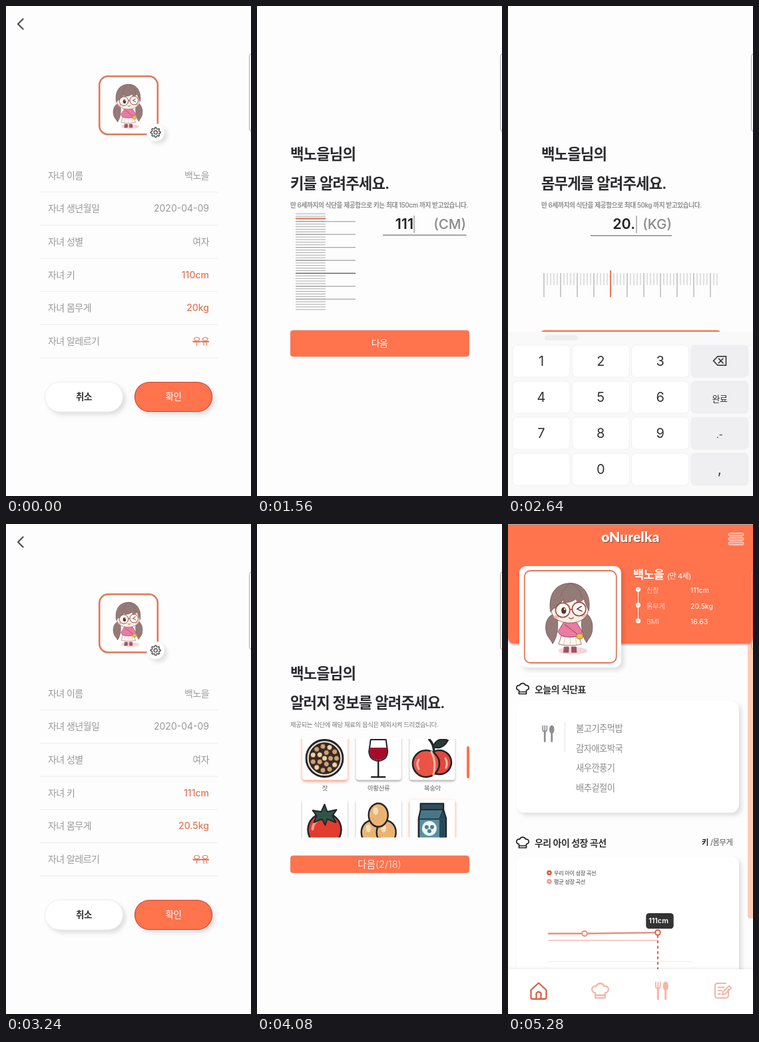
Write an HTML page that moves like this. It is 368 px wide and 734 px high and loops after 5400 ms.

```html
<!DOCTYPE html>
<html lang="ko">
<head>
<meta charset="utf-8">
<title>Child profile</title>
<style>
html, body { margin: 0; width: 100%; height: 100%; overflow: hidden; background: #fdfdfd; }
svg { display: block; width: 100vw; height: 100vh; }
text { font-family: Inter, 'Noto Sans CJK KR', 'Noto Sans CJK', sans-serif; white-space: pre; }
.logo { font-family: Lato, sans-serif; }
.soft { filter: drop-shadow(4px 4px 3px rgba(0,0,0,.12)); }
.low { filter: drop-shadow(0 2.5px 1.5px rgba(0,0,0,.32)); }
.pick { filter: drop-shadow(0 2.5px 2px rgba(255,90,50,.7)); }
</style>
</head>
<body>
<svg id="stage" viewBox="0 0 368 734" preserveAspectRatio="none"></svg>
<script>
const LOOP = 5400, STEP = 120;
const ORANGE = '#ff734d', RUST = '#e0785a', INK = '#2b2a2f', NAME = '백노을', BRAND = 'oNurelka';
const range = n => [...Array(n).keys()];
const clamp = v => Math.max(0, Math.min(1, v));

const text = (x, y, size, str, fill = INK, weight = 400, anchor = 'start', more = '') => {
  const gap = /[가-힣]/.test(str) ? -0.04 * size : 0;
  return `<text x="${x}" y="${y}" font-size="${size}" fill="${fill}" font-weight="${weight}"
    text-anchor="${anchor}" letter-spacing="${gap}" ${more}>${str}</text>`;
};
const rect = (x, y, w, h, r, fill, more = '') =>
  `<rect x="${x}" y="${y}" width="${w}" height="${h}" rx="${r}" fill="${fill}" ${more}/>`;
const line = (x1, y1, x2, y2, color, w = 1, more = '') =>
  `<line x1="${x1}" y1="${y1}" x2="${x2}" y2="${y2}" stroke="${color}" stroke-width="${w}" ${more}/>`;
const circle = (x, y, r, fill, more = '') => `<circle cx="${x}" cy="${y}" r="${r}" fill="${fill}" ${more}/>`;
const oval = (x, y, rx, ry, fill, more = '') =>
  `<ellipse cx="${x}" cy="${y}" rx="${rx}" ry="${ry}" fill="${fill}" ${more}/>`;
const path = (d, fill, stroke = 'none', w = 1, more = '') =>
  `<path d="${d}" fill="${fill}" stroke="${stroke}" stroke-width="${w}" stroke-linecap="round" stroke-linejoin="round" ${more}/>`;
const group = (id, body, more = '') => `<g id="${id}" ${more}>${body}</g>`;
const at = (x, y, body, s = 1) => `<g transform="translate(${x} ${y}) scale(${s})">${body}</g>`;

function gear(x, y) {
  const pts = range(32).map(i => {
    const a = (i - 0.5) * Math.PI / 16, r = i % 4 < 2 ? 7.4 : 5.6;
    return `${(x + r * Math.cos(a)).toFixed(1)} ${(y + r * Math.sin(a)).toFixed(1)}`;
  });
  return path(`M${pts.join('L')}Z`, 'none', '#555', 1.5) + circle(x, y, 2.6, 'none', 'stroke="#555" stroke-width="1.4"');
}

function girl() {
  const hair = '#957b78', edge = '#6d5052', skin = '#feeee4';
  return oval(186.5, 180.5, 13.5, 3.6, '#fad3d6') +
    path('M169 146C162 148 160 156 161.5 163C162.5 168 166 170 167.5 174C172 168 173 158 172 150Z', hair, edge, .5) +
    path('M198 145C204 148 206 156 204.5 163C203.5 168 201 169 199.5 173C195 167 194 157 195 150Z', hair, edge, .5) +
    path('M180.5 173V180M187.5 173V180', 'none', skin, 3.6) +
    path('M178.5 177h4v5h-4.5zM185.5 177h4l.5 5h-4.5z', '#a65264', edge, .5) +
    path('M176 166H192L194.5 174.5Q184 177 173.5 174.5Z', '#fff7f2', '#9b7274', .6) +
    path('M179 168L178 175M184 168V176M189 168L190 175', 'none', '#d7b9b6', .5) +
    path('M178 154Q184 152 190 154L195.5 163L192.5 166.5Q184 169 175.5 166.5L172.5 163Z', '#ea7ba3', '#8d4058', .6) +
    path('M179 156L192 166', 'none', '#a14b52', .7) + rect(190, 164.5, 6, 5, 2, '#efbd48', 'stroke="#98722a" stroke-width=".5"') +
    path('M166 141C166 127 173 118 184 117.5C195 117 202 127 201 141C201 150 193 154.5 183.5 154.5C174 154.5 166 150 166 141Z', skin, edge, .5) +
    path('M165.5 144C163 127 171 117.3 184 117.3C196 117.3 204 128 201.5 143C199.5 139 198 136 197 132C195 134 193 135 191 135.5L189.5 132Q185 135.5 178 135.5L177.5 132C175.5 137 171 140 168.5 141Z', hair, edge, .5) +
    path('M184 117.5Q177 122 175 130M186 118Q194 123 195 131', 'none', '#7d6260', .5) +
    oval(171, 148.8, 2.6, 1.5, '#f9b6b0') + oval(196.5, 147.5, 2.6, 1.5, '#f9b6b0') +
    circle(177, 142.5, 6.7, '#fff8', 'stroke="#96504a" stroke-width="1"') +
    circle(192.3, 141.5, 6.4, '#fff8', 'stroke="#96504a" stroke-width="1"') +
    path('M183.7 141.9L186 141.7', 'none', '#96504a', 1) +
    oval(178, 143, 2.3, 3.1, '#57302f') + circle(178.8, 141.6, .8, '#fff') +
    path('M194.5 139L190.5 141.5L195 143.5', 'none', '#57302f', .9) +
    path('M183 149.7Q185 151.6 187 149.4', 'none', '#a24a48', .8);
}

const hat = (x, y, color, s = 1) => at(x, y, path(
  'M-5.5 8V2.5C-11 1.5 -10 -6 -4.5 -4.8C-2.8 -9 2.8 -9 4.5 -4.8C10 -6 11 1.5 5.5 2.5V8ZM-5.5 5H5.5', 'none', color, 1.7), s);
const cutlery = (x, y, color, s = 1) => at(x, y,
  path('M-8 -11V-5.5Q-8 -3 -5 -3Q-2 -3 -2 -5.5V-11M-5 -11V-3', 'none', color, 1.6) +
  path('M-5 -3V11M5 0V11', 'none', color, 2.6) + oval(5, -6, 3.6, 6, color), s);

function profile() {
  const rows = [['이름', NAME], ['생년월일', '2020-04-09'], ['성별', '여자'], ['키', ''], ['몸무게', ''], ['알레르기', '우유']];
  const body = rows.map(([label, value], i) => {
    const y = 258.8 + i * 49.65, hot = i > 2;
    return text(63, y, 14, '자녀 ' + label, '#999') + line(51, y + 20, 318, y + 20, '#ececec') +
      text(305, y, 14, value, hot ? RUST : '#999', hot ? 500 : 400, 'end',
        (i == 3 ? 'id="cm" ' : i == 4 ? 'id="kg" ' : '') + (i == 5 ? 'text-decoration="line-through"' : ''));
  });
  return path('M25.5 19.5L18 27L25.5 34.5', 'none', '#555', 2.4) +
    rect(140.3, 105.3, 87.5, 87, 13, '#fff', `stroke="${RUST}" stroke-width="2.6"`) + '<use href="#girl"/>' +
    rect(211.5, 176.5, 18, 18, 0, '#fdfdfd') + circle(225, 189.5, 13, '#fdfdfd', 'class="soft"') + gear(224.7, 189.3) +
    body.join('') +
    rect(58.5, 563, 117, 45, 22.5, '#fff', 'class="soft" stroke="#e8e8e8" stroke-width=".8"') +
    rect(193.5, 563.5, 116, 44, 22, ORANGE, 'class="soft" stroke="#c64a35" stroke-width="1.2"') +
    text(117, 590.3, 13.5, '취소', '#333', 600, 'middle') + text(251.5, 590.3, 13.5, '확인', '#fff', 500, 'middle');
}

const heading = (second, y) => text(50, y, 22.3, NAME + '님의', INK, 600) + text(50, y + 43.5, 22.3, second, INK, 600);
const bar = (y, h) => rect(50.3, y, 268.4, h, 4, ORANGE, 'stroke="#ea7a5c" stroke-width=".8"');
const next = bar(486, 39) + text(184, 510.3, 14, '다음', '#fff0ea', 300, 'middle');

function height() {
  const ticks = range(38).map(i => {
    const k = i - 3, y = 322.8 + k * 3.88, major = k >= 0 && k % 5 == 0;
    return line(58, y, 103, y, '#a9a9a9', 1) +
      (major ? line(58, y, 148, y, k == 20 ? '#555' : k == 15 ? '#888' : '#a5a5a5', 1.2) : '');
  });
  return heading('키를 알려주세요.', 230) +
    text(50, 302, 9.7, '만 6세까지의 식단을 제공함으로 키는 최대 150cm 까지 받고있습니다.', '#8d8d8d', 600) +
    ticks.join('') + rect(58, 0, 45, 2.2, 0, '#f07a62', 'id="mark"') +
    text(235, 334, 21.5, '', '#222', 600, 'end', 'id="tall"') + line(236, 314, 236, 340, '#777', 1, 'class="caret"') +
    text(314, 334, 20.5, '(CM)', '#888', 500, 'end') + line(189, 343.3, 314.5, 343.3, '#8a8a8a', 1.4) + next;
}

function weight() {
  const ticks = range(53).map(i => line(54 + i * 5, 400, 54 + i * 5, i % 5 ? 418 : 436, i % 5 ? '#c4c4c4' : '#999'));
  return heading('몸무게를 알려주세요.', 230) +
    text(50, 302, 9.7, '만 6세까지의 식단을 제공함으로 최대 50kg 까지 받고있습니다.', '#8d8d8d', 600) +
    text(191, 334, 21.5, '', '#222', 600, 'end', 'id="heavy"') + line(193, 314, 193, 340, '#777', 1, 'class="caret"') +
    text(246, 334, 20.5, '(KG)', '#888', 500, 'end') + line(124, 344, 246, 344, '#8a8a8a', 1.4) +
    ticks.join('') + rect(0, 396, 2.2, 40, 0, '#f07a62', 'id="pin"') + next;
}

function keyboard() {
  const keys = ['1', '2', '3', '⌫', '4', '5', '6', '완료', '7', '8', '9', '.-', '', '0', '', ','];
  return rect(0, 488, 368, 250, 0, '#f9f9fa') + rect(55, 493, 50, 8, 4, '#eeeeef') +
    keys.map((k, i) => {
      const x = 7 + i % 4 * 89.3, y = 508 + (i >> 2) * 54;
      return rect(x, y, 86, 48, 6, i % 4 == 3 ? '#efeff1' : '#fff', 'stroke="#ececee" stroke-width=".8"') +
        text(x + 43, y + 31, k.length > 1 ? 13 : 20, k, '#333', 400, 'middle');
    }).join('');
}

// Food pictures, each drawn around its own centre
const dark = '#22242b', rim = w => `stroke="${dark}" stroke-width="${w}"`;
const foods = {
  '잣': circle(0, 0, 27.5, '#ecdcc6', rim(2.8)) + circle(0, 0, 23, '#3c2822', rim(1.5)) +
    range(17).map(i => {
      const ring = i ? (i < 6 ? 9 : 18) : 0, a = i * Math.PI * 2 / (i < 6 ? 5 : 11);
      return circle(ring * Math.cos(a), ring * Math.sin(a), 4, i % 3 ? '#d0a070' : '#efd0a2', rim(.8));
    }).join(''),
  '아황산류': path('M-11.5 -28H11.5L14 -10Q13 3 0 4Q-13 3 -14 -10Z', '#fff', dark, 2) + path('M-12.7 -16H12.7L13.2 -9Q12 2 0 3Q-12 2 -13.2 -9Z', '#a60b2c') +
    path('M0 4V27M-10 28H10', 'none', dark, 2.4),
  '복숭아': circle(11, 6, 18, '#e2463c', rim(2.6)) + circle(-9, 8, 20, '#ea5445', rim(2.6)) +
    path('M-1 -10Q7 6 2 25M-20 2Q-24 8 -20 16M20 0Q24 6 21 14', 'none', '#ffb9a2', 3) + path('M3 -11Q2 -22 -4 -28', 'none', dark, 3.5) +
    path('M1 -17Q8 -33 24 -27Q16 -12 1 -17Z', '#273c33', dark, 2),
  '토마토': circle(0, 9, 25, '#e23b30', rim(2.6)) + path('M-18 8Q-17 -2 -10 -5', 'none', '#ff9d8a', 4) +
    path('M0 -29L4 -18L18 -21L12 -12L17 -2L4 -7L1 2L-4 -7L-16 -2L-12 -12L-18 -20L-5 -18Z', '#2f5547', dark, 2),
  '난류': [[-11, 13], [12, 13], [0, -13]].map(([x, y]) => oval(x, y, 14.5, 17.5, '#e9b473', rim(2.4)) +
    oval(x - 4, y - 6, 4, 6, '#f8dcae')).join(''),
  '우유': path('M-17 -30H17V-21L21 -8V36H-20V-8L-17 -21Z', '#5a8fa2', dark, 2.6) + path('M-17 -30H17V-21H-17Z', '#2f4e5c', dark, 2) +
    path('M-17 -21H17L11 -7H-20Z', '#477787', dark, 1.5) + path('M11 -7L17 -19L20 -8V35H11Z', '#27495a') +
    circle(-4, 7, 11, '#eef4f2') + circle(-8, 5, 3, '#4b7f92') + circle(0, 5, 3, '#4b7f92') + circle(-4, 11, 3, '#4b7f92')
};

function allergy() {
  const cards = Object.entries(foods).map(([name, art], i) => {
    const x = 68 + i % 3 * 80.7, y = 315 + (i > 2) * 98;
    const id = i ? '' : 'id="nut" ';
    return rect(x, y, 68, 68.5, 4, '#fff', `${id}class="${i == 5 ? 'pick' : 'low'}"`) + at(x + 33.5, y + 36, art) +
      text(x + 34, y + 84, 9.5, name, '#666', 400, 'middle');
  });
  return heading('알러지 정보를 알려주세요.', 232) +
    text(50, 304, 9.4, '제공되는 식단에 해당 재료의 음식은 제외시켜 드리겠습니다.', '#777') +
    `<g clip-path="url(#list)">${group('cards', cards.join(''))}</g>` + rect(315, 333, 4, 48, 2, ORANGE, 'id="thumb"') +
    bar(497, 25.6) + text(184, 515, 14.5, '', '#fff0ea', 300, 'middle', 'id="count"');
}

function dashboard() {
  const stats = [['신장', '111cm'], ['몸무게', '20.5kg'], ['BMI', '16.63']].map(([k, v], i) => {
    const y = 98 + i * 23.6;
    return circle(195.5, y, 3.6, '#fff') + circle(195.5, y, 1, '#ffb7a2') +
      text(208, y + 5, 10.5, k, '#ffc9b9') + text(274, y + 5, 10.5, v, '#fff');
  });
  const menu = ['불고기주먹밥', '감자애호박국', '새우깐풍기', '배추겉절이'].map((m, i) => text(102, 311.3 + i * 29.4, 13.3, m, '#8b8b8b'));
  const legend = ['우리 아이 성장 곡선', '평균 성장 곡선'].map((m, i) => {
    const y = 522.5 + i * 13;
    return circle(62, y, 3.7, i ? '#f0998a' : '#d9543c') + circle(62, y, 1.2, '#fff') + text(69, y + 3, 8.2, m, '#444', 500);
  });
  const card = (y, h) => rect(13, y, 334, h, 12, '#fff', 'class="soft panel"');
  const knob = (x, y, c) => circle(x, y, 3.8, '#fff', `stroke="${c}" stroke-width="2"`);
  const pale = '#f5b5a5', red = '#db6047';
  return rect(0, 0, 368, 734, 0, '#fdfdfd') + rect(360, 170, 10, 421, 4, '#ffcdb6') +
    path('M0 1H368V168Q368 179 357 179H11Q0 179 0 168Z', ORANGE, 'none', 1, 'class="low"') + rect(0, 0, 368, 1, 0, '#aaa') +
    text(184.8, 28, 21, BRAND, '#8b4a38', 900, 'middle', 'class="logo"') +
    text(183.8, 27, 21, BRAND, '#fff', 900, 'middle', 'class="logo"') +
    range(3).map(i => rect(331, 13.5 + i * 6.7, 23, 4.4, 2.2, '#ff9a7e', 'stroke="#ffe6de" stroke-width="1"')).join('') +
    rect(17, 63, 153, 152, 10, '#fff', 'class="soft"') + rect(24.8, 70, 138, 138, 9, '#fff', `stroke="${RUST}" stroke-width="1.8"`) +
    '<use href="#girl" transform="translate(-201 -99) scale(1.6)"/>' +
    text(188, 82.3, 17.5, NAME, '#fff', 700) + text(239, 82.3, 11, '(만 4세)', '#fff') +
    line(195.5, 98, 195.5, 146, '#fff') + stats.join('') +
    hat(22, 246.5, '#222') + text(40, 252.6, 14, '오늘의 식단표', '#333', 600) + card(265, 167.5) +
    cutlery(60.5, 314, '#8d8d94', 1.05) + line(85.5, 296, 85.5, 342, '#e6e6e6') + menu.join('') +
    hat(22, 477, '#222') + text(40, 483.4, 14, '우리 아이 성장 곡선', '#333', 600) +
    text(291, 480.5, 11.3, '키', '#222', 700) + text(304, 480.5, 11.3, '/몸무게', '#555') +
    card(498, 200) + legend.join('') +
    line(61, 655.5, 276, 655.5, '#ececec') + line(61, 623.7, 225, 623.7, '#efb1a6', 1.2) +
    path('M61 613.5L115 613.5L225 612', 'none', '#e8917f', 2.6, 'id="curve" pathLength="1"') +
    line(225, 616, 225, 668, red, 2, 'stroke-dasharray="4 4"') + knob(115, 613.5, '#e8917f') + knob(225, 612, red) +
    rect(207.3, 583, 41.4, 23.2, 4.5, '#333') + text(226, 598.2, 10.8, '111cm', '#fff', 600, 'middle') +
    rect(0, 667, 368, 67, 0, '#fff', 'style="filter:drop-shadow(0 -2px 2px #0001)"') +
    path('M34.5 698L46 687.5L57.5 698V709Q57.5 711.5 55 711.5H37Q34.5 711.5 34.5 709ZM42.5 711V703Q46 698.5 49.5 703V711', 'none', red, 2.3) +
    hat(138.5, 699, pale, 1.35) + cutlery(231, 699, pale, 1.15) +
    path('M331 697V706Q331 710 327 710H315Q311 710 311 706V692Q311 688 315 688H327M316 694H324M316 699H321M316 704H319M322 705L323 701L332 692L335 695L326 704Z', 'none', pale, 2);
}

function loader() {
  return group('veil', rect(0, 0, 368, 734, 0, '#fff')) + group('busy',
    path('M147 345A38 38 0 1 0 222 350', 'none', '#e67b5d', 4, 'id="arc"') +
    path('M164 356H205Q204 368 195 373L193 377H176L174 373Q165 367 164 356ZM168 355Q163 348 170 347Q172 342 178 346Q183 341 187 346Q194 345 194 350Q199 350 199 355M192 347L196 338M198 349L207 338', 'none', '#d97a5e', 1.7) +
    text(184.3, 416, 13.6, 'Loading...', '#ec7750', 900, 'middle', 'class="logo"'));
}

const stage = document.getElementById('stage');
stage.innerHTML = `<defs>${group('girl', girl())}<clipPath id="list"><rect x="50" y="322" width="262" height="147.5"/></clipPath></defs>` +
  rect(0, 0, 368, 734, 0, '#fdfdfd') + group('profile', profile()) + group('height', height()) + group('weight', weight()) +
  group('allergy', allergy()) + group('keys', keyboard()) + group('home', dashboard()) + loader() +
  rect(365.5, 71.5, 12, 116.5, 4, 'none', 'stroke="#aaa" stroke-width="1"');

const $ = id => document.getElementById(id);
const set = (id, key, value) => $(id).setAttribute(key, value);
const say = (id, str) => { $(id).textContent = str; };
// Half visible on the step of a switch, whole after it
const shown = (t, from, to) => Math.min(clamp((t - from) / 240 + .5), clamp((to - t) / 240 + .5));
const fade = (id, v) => { set(id, 'opacity', v); $(id).style.display = v > 0 ? '' : 'none'; };

function draw(time) {
  const t = Math.floor(time % LOOP / STEP) * STEP;
  fade('profile', Math.max(shown(t, -240, 360), shown(t, 1920, 2400), shown(t, 3120, 3480), shown(t, 4320, 4680)));
  fade('height', shown(t, 360, 1920));
  fade('weight', shown(t, 2400, 3120));
  fade('allergy', shown(t, 3480, 4320));
  fade('home', clamp((t - 4440) / 240));

  const tall = t < 960 ? '110' : t < 1080 ? '11' : '111';
  const heavy = t < 2640 ? '20' : t < 2760 ? '20.' : '20.5';
  say('tall', tall);
  say('heavy', heavy);
  say('cm', t < 1080 ? '110cm' : '111cm');
  say('kg', t < 2760 ? '20kg' : '20.5kg');
  set('mark', 'y', t < 1080 ? 321.5 : 317.3);
  set('pin', 'x', 52.9 + parseFloat(heavy) * 5);
  const typing = t >= 720 && t < 1920 || t >= 2520 && t < 3120;
  document.querySelectorAll('.caret').forEach(c => c.setAttribute('opacity', +typing));
  const up = Math.max(Math.min(clamp((t - 600) / 240), clamp((1560 - t) / 240)), Math.min(clamp((t - 2400) / 240), clamp((3000 - t) / 240)));
  fade('keys', +(up > 0));
  set('keys', 'transform', `translate(0 ${(1 - up) * 246})`);

  const left = (1 - clamp((t - 3600) / 240)) ** 2;
  set('cards', 'transform', `translate(0 ${left * 34})`);
  set('thumb', 'y', 333 - left * 11);
  const picked = t >= 3960;
  set('nut', 'class', picked ? 'pick' : 'low');
  say('count', `다음(${picked ? 2 : 1}/18)`);

  const busy = t < 4560 ? 0 : clamp((5160 - t) / 240);
  fade('veil', busy * .74);
  fade('busy', busy);
  set('arc', 'transform', `rotate(${(t - 4680) * .4} 184.5 354)`);
  const drawn = clamp((t - 4660) / 460);
  set('curve', 'stroke-dasharray', `${drawn} 2`);
  document.querySelectorAll('.panel').forEach(p => p.setAttribute('opacity', clamp((t - 4680) / 360)));
}

function tick() {
  draw(performance.now());
  requestAnimationFrame(tick);
}
tick();
</script>
</body>
</html>
```
